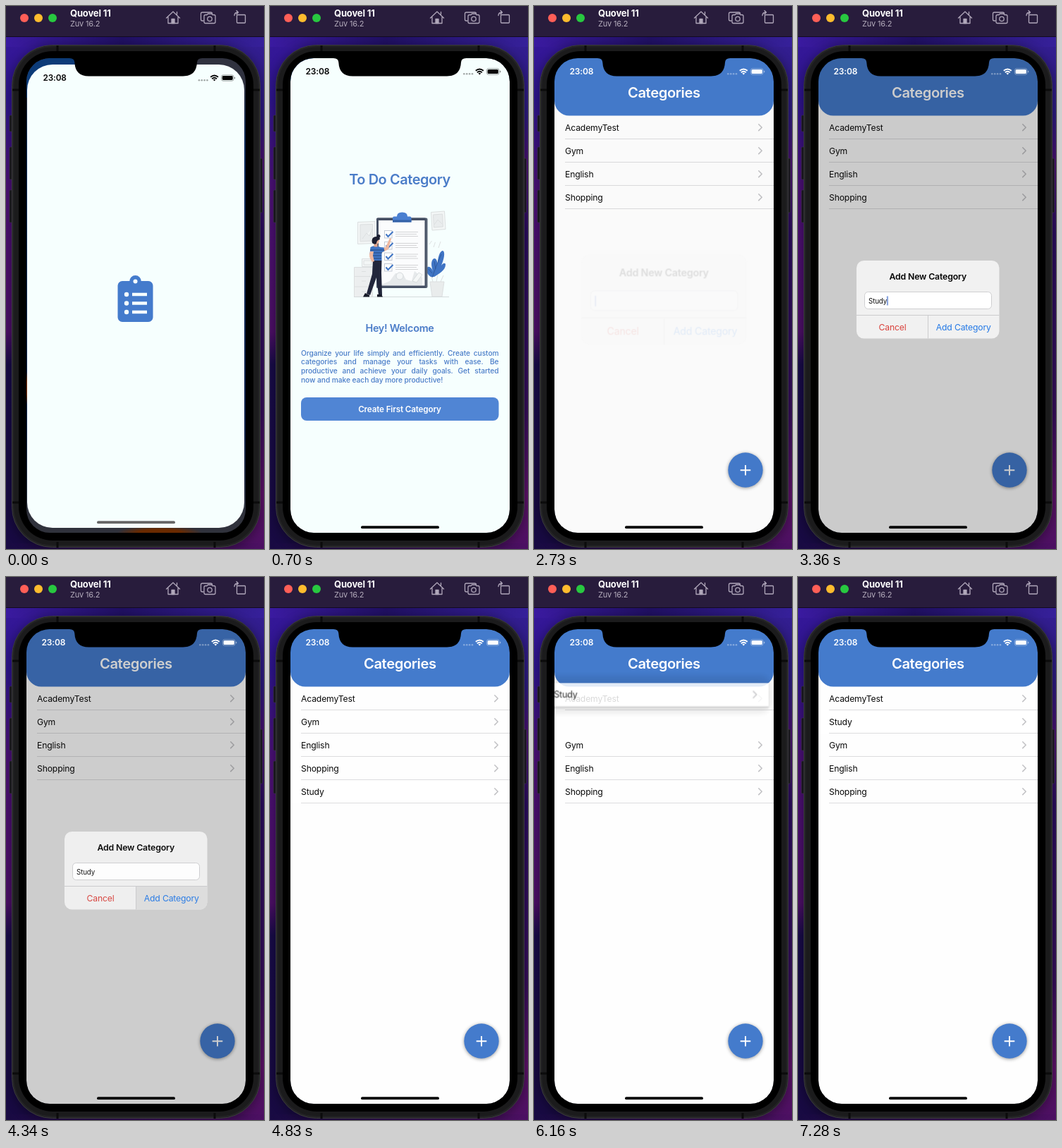
Write an HTML page that moves like this. It is 366 by 770 pixels and loops after 8 s.

```html
<!DOCTYPE html>
<html lang="en">
<head>
<meta charset="utf-8">
<title>To Do Category</title>
<style>
html, body { margin: 0; width: 100%; height: 100%; overflow: hidden; background: #1c0f50; }
.layer, .layer > svg { position: absolute; left: 0; top: 0; width: 366px; height: 770px; }
svg { display: block; font-family: Inter, "Open Sans", sans-serif; letter-spacing: -.01em; }
.screen {
  clip-path: inset(74px 26px 23px 29px round 33px);
  background:
    radial-gradient(ellipse 60px 10px at 218px 747px, #6a2a00 50%, transparent),
    radial-gradient(ellipse 3px 24px at 29px 542px, #8a3500 40%, transparent),
    linear-gradient(90deg, #0c3b78 30%, transparent 60%) 0 0 / 100% 130px no-repeat,
    linear-gradient(#30323f 110px, #0d2c5c 200px, #12244c 600px, #30323c 720px);
}

/* one shared 8 s clock */
.a { animation: 8s linear infinite; }
.step { animation-timing-function: step-end; }

.app { animation-name: open; }
@keyframes open {
  0%, .8% { clip-path: inset(83px 28px 30px 30px round 36px); animation-timing-function: ease-out; }
  3.2%, 100% { clip-path: inset(74px 26px 23px 29px round 33px); }
}
.status { transform-origin: 184px 93px; animation-name: settle, tint; }
@keyframes settle {
  0%, .8% { transform: translateY(9px) scale(.985); animation-timing-function: ease-out; }
  3.2%, 100% { transform: none; }
}
@keyframes tint { 0%, 18% { color: #050505; } 18.9%, 100% { color: #fff; } }
.home { animation-name: rise; }
@keyframes rise {
  0%, .8% { transform: translateY(-7px); fill: #666; animation-timing-function: ease-out; }
  3.2%, 100% { transform: none; fill: #000; }
}
.splash { animation-name: splash; }
@keyframes splash { 0%, 5.8% { opacity: 1; } 8.7%, 100% { opacity: 0; } }
.press { animation-name: press; }
@keyframes press { 0% { opacity: 1; } 14.87% { opacity: .75; } 15.74%, 100% { opacity: 1; } }

.cats { animation-name: push; }
@keyframes push {
  0%, 17.94% { transform: translateX(311px); animation-timing-function: cubic-bezier(.2, .7, .2, 1); }
  25%, 100% { transform: none; }
}
.welcome { animation-name: slide; }
@keyframes slide {
  0%, 17.94% { transform: none; animation-timing-function: cubic-bezier(.2, .7, .2, 1); }
  25%, 100% { transform: translateX(-93px); }
}
.shade { mix-blend-mode: multiply; animation-name: shade; }
@keyframes shade {
  0%, 17.94% { opacity: 0; animation-timing-function: cubic-bezier(.2, .7, .2, 1); }
  25%, 100% { opacity: 1; }
}
.plus { animation-name: plus; }
@keyframes plus { 0% { opacity: 1; } 29.74% { opacity: .55; } 34.1%, 100% { opacity: 1; } }

.dim { animation-name: dim; }
@keyframes dim { 0%, 33.9% { opacity: 0; } 37.2%, 54.1% { opacity: .2; } 57.6%, 100% { opacity: 0; } }
.alert { transform-origin: 184px 416px; animation-name: alert; }
@keyframes alert {
  0%, 33.9% { opacity: 0; transform: scale(1.18); animation-timing-function: ease-out; }
  37.2%, 54.1% { opacity: 1; transform: none; }
  57.6%, 100% { opacity: 0; transform: none; }
}
.k1 { animation-name: k1; } .k2 { animation-name: k2; } .k3 { animation-name: k3; } .k4 { animation-name: k4; }
@keyframes k1 { 0% { fill: transparent; } 38.49%, 100% { fill: #111; } }
@keyframes k2 { 0% { fill: transparent; } 39.36%, 100% { fill: #111; } }
@keyframes k3 { 0% { fill: transparent; } 40.24%, 100% { fill: #111; } }
@keyframes k4 { 0% { fill: transparent; } 41.99%, 100% { fill: #111; } }
.caret { animation-name: caret; }
@keyframes caret {
  0% { transform: none; opacity: 1; }
  38.49% { transform: translateX(6.3px); }
  39.36% { transform: translateX(9.7px); }
  40.24% { transform: translateX(15.4px); }
  41.99% { transform: translateX(26.6px); opacity: 1; }
  49.87% { transform: translateX(26.6px); opacity: .4; }
  50.74%, 100% { transform: translateX(26.6px); opacity: 0; }
}
.tap { animation-name: tap; }
@keyframes tap { 0% { opacity: 0; } 52.49% { opacity: 1; } 58%, 100% { opacity: 0; } }

.added { animation-name: added; }
@keyframes added { 0% { opacity: 0; } 60.37%, 100% { opacity: 1; } }
.held { animation-name: held; }
@keyframes held { 0% { fill: #fff; } 68.24% { fill: #e5e5ea; } 70.86%, 100% { fill: #fff; } }
.drag { transform-origin: 29px 288px; animation-name: drag; }
@keyframes drag {
  0%, 70.6% { transform: none; opacity: 1; animation-timing-function: ease-out; }
  71.8% { transform: translate(-6px, -10px) scale(1.03); opacity: .85; animation-timing-function: cubic-bezier(.4, .3, .6, 1); }
  76.9%, 81.3% { transform: translate(-16.4px, -138px) scale(1.03); opacity: .85; }
  83.1%, 84.8% { transform: translate(-16.4px, -140px) scale(1.03); opacity: .85; animation-timing-function: ease-in-out; }
  90.8%, 100% { transform: translate(0, -99px); opacity: 1; }
}
.lift { filter: blur(4px); animation-name: lift; }
@keyframes lift { 0%, 70.6% { opacity: 0; } 72%, 84.8% { opacity: .1; } 90.8%, 100% { opacity: 0; } }
.edge { filter: blur(1.2px); animation-name: edge; }
@keyframes edge { 0%, 70.6% { opacity: 0; } 72%, 84.8% { opacity: .14; } 90.8%, 100% { opacity: 0; } }
.s1 { animation-name: s1; } .s2 { animation-name: s2; } .s3 { animation-name: s3; }
@keyframes s1 { 0%, 71.7% { transform: none; } 73.8%, 100% { transform: translateY(33px); } }
@keyframes s2 { 0%, 73.3% { transform: none; } 75.1%, 100% { transform: translateY(33px); } }
@keyframes s3 { 0%, 74.9% { transform: none; } 76.8%, 100% { transform: translateY(33px); } }

.mid { text-anchor: middle; }
.head { text-anchor: middle; font-weight: 600; letter-spacing: -.02em; }
.item { font-size: 12.2px; fill: #0a0a0a; }
.fab { filter: drop-shadow(0 1px 2.5px rgba(0, 0, 0, .4)); }
.glow { filter: blur(7px); opacity: .3; }
.para { font-size: 10.2px; font-weight: 500; line-height: 12.6px; letter-spacing: -.005em; color: #4a7cc8; }
.para div { text-align: justify; text-align-last: justify; }
.para div:last-child { text-align-last: left; }
</style>
</head>
<body>
<div class="layer">
  <svg viewBox="0 0 366 770">
    <defs>
      <linearGradient id="left" x2="0" y2="1">
        <stop offset="0" stop-color="#3a1aa0"/><stop offset=".17" stop-color="#2d148c"/>
        <stop offset=".33" stop-color="#4a1075"/><stop offset=".6" stop-color="#4c0f66"/>
        <stop offset=".66" stop-color="#180b48"/><stop offset="1" stop-color="#180a42"/>
      </linearGradient>
      <linearGradient id="right" x2="0" y2="1">
        <stop offset="0" stop-color="#36209a"/><stop offset=".2" stop-color="#2c1a7e"/>
        <stop offset=".29" stop-color="#48106e"/><stop offset=".42" stop-color="#2a0d5e"/>
        <stop offset=".75" stop-color="#360e5a"/><stop offset=".9" stop-color="#5c1268"/>
        <stop offset="1" stop-color="#4c1062"/>
      </linearGradient>
      <linearGradient id="strip">
        <stop offset="0" stop-color="#3a1aa0"/><stop offset=".45" stop-color="#201062"/><stop offset="1" stop-color="#36209a"/>
      </linearGradient>
      <linearGradient id="floor">
        <stop offset="0" stop-color="#180a42"/><stop offset="1" stop-color="#4c1062"/>
      </linearGradient>
    </defs>
    <rect width="183" height="770" fill="url(#left)"/>
    <rect x="183" width="183" height="770" fill="url(#right)"/>
    <rect y="44" width="366" height="14" fill="url(#strip)"/>
    <rect y="762" width="366" height="8" fill="url(#floor)"/>
    <rect class="glow" x="6" y="56" width="357" height="716" rx="58"/>
    <rect width="366" height="43" fill="#281c3c"/>
    <rect y="43" width="366" height="1" fill="#120b20"/>
    <circle cx="26" cy="17" r="6" fill="#ff5f57"/>
    <circle cx="46" cy="17" r="6" fill="#febc2e"/>
    <circle cx="66" cy="17" r="6" fill="#28c840"/>
    <text x="91" y="15" font-size="13" font-weight="700" fill="#fff">Quovel 11</text>
    <text x="91" y="29" font-size="11" fill="#b5adbd">Zuv 16.2</text>
    <g fill="none" stroke="#b0a7ba" stroke-width="1.3" stroke-linejoin="round" stroke-linecap="round">
      <path d="M227.500 17L237 8l9.500 9M230 15.500V24.500h14v-9M242.500 12V8.500"/>
      <path d="M235 24.500v-6h4v6z" fill="#b0a7ba"/>
      <path d="M280 21h-1.500q-2 0-2-2v-8q0-2 2-2h12q2 0 2 2"/>
      <path d="M283 12.500h2l1.500-1.500h5l1.500 1.500h2q2 0 2 2v8q0 2-2 2h-12q-2 0-2-2v-8q0-2 2-2z"/>
      <circle cx="289" cy="18.300" r="3.200"/>
      <rect x="327.500" y="12.500" width="12" height="11.500" rx="1"/>
      <path d="M324 13.500q0-4.500 5.500-4.500M327 6.500l2.500 2.500-2.500 2.500"/>
    </g>
    <g fill="#17151c" stroke="#39363f" stroke-width=".6">
      <rect x="5" y="155" width="6" height="23" rx="1.500"/>
      <rect x="5" y="200" width="6" height="46" rx="1.500"/>
      <rect x="5" y="261" width="6" height="46" rx="1.500"/>
      <rect x="358" y="216" width="5.500" height="77" rx="1.500"/>
    </g>
    <rect x="8.500" y="55.500" width="352" height="712" rx="57" fill="#232325" stroke="#3b3b3d"/>
    <rect x="11.500" y="58.500" width="346" height="706" rx="54" fill="#1b1b1c"/>
    <path d="M9 119h9M351 119h9M9 704h9M351 704h9M73 56v8M296 56v8M73 760v8M296 760v8" stroke="#0b0b0b" stroke-width="3"/>
    <rect x="18" y="64" width="333" height="694" rx="48"/>
  </svg>
</div>

<div class="layer screen">
  <div class="layer app a">
    <svg viewBox="0 0 366 770">
      <defs>
        <g id="row">
          <path d="M44 188.500H340" stroke="#dcdcde"/>
          <path d="M318.800 167.800l4.400 4.400-4.400 4.400" fill="none" stroke="#c3c3c6" stroke-width="1.600" stroke-linecap="round" stroke-linejoin="round"/>
        </g>
        <g id="check">
          <rect x="162.500" y="318.500" width="10.500" height="10.500" fill="#fff" stroke="#c3c9d4"/>
          <path d="M164.500 323.500l3 3.500 7-7" fill="none" stroke="#3f74c4" stroke-width="2"/>
          <path d="M178 320.500h32M178 323.500h30M178 326.500h32" stroke="#d3d3d5" stroke-width="1"/>
        </g>
      </defs>

      <g class="welcome a">
        <rect x="29" y="74" width="311" height="673" fill="#f6fffe"/>
        <text class="head" x="184" y="253.300" font-size="19.900" fill="#4a7cc8">To Do Category</text>

        <g fill="#f3f6f6" stroke="#dcdfe0">
          <path d="M124.500 306.500l24.500-1v31l-24.500 1z"/>
          <path d="M128 310l17.500-.5v23.500l-17.500 1zM131 330l6-8 4 4 4-10" fill="#e9eced"/>
          <path d="M228.500 292.500l19-1.500 1.500 25.500-19 1.500z"/>
          <path d="M231.500 296l13-1 1 18-13 1zM233 310l5-7 6 6" fill="#e9eced"/>
          <path d="M226 338q4-6 3-4M232 342q3-8 2-7M239 343l3-9" fill="none"/>
          <path d="M130.500 358.500h16v11h-16zM133 361h11v6h-11z"/>
          <path d="M119.500 370.500h26v42h-26zM119.500 383.500h26M119.500 398h26M130 376.500h6M130 390h6M130 405h6" fill="#eceeef"/>
          <path d="M227 391h20l-3 21h-14z" fill="#e9ecec"/>
          <path d="M231 391l-2-8M236 391l2-10M242 391l4-9" fill="none"/>
        </g>
        <g fill="#3f74c4">
          <path d="M228 384c-9-7-6-13-4-14 3-1 6 3 7 6-4-12-1-17 2-18 4 0 5 6 4 12 1-14 4-23 8-23 4 1 2 12-2 21 3-4 6-4 6-1 0 8-10 13-16 17z"/>
          <path d="M230 385q5-15 13-33M230 379l-5-6M235 373l-2-11" fill="none" stroke="#2d5595" stroke-width=".8"/>
        </g>
        <rect x="151" y="300.500" width="72.500" height="99.500" rx="2" fill="#5a6475"/>
        <rect x="151" y="300.500" width="70.500" height="99.500" rx="2" fill="#465064"/>
        <rect x="154" y="304" width="65.500" height="92.500" fill="#fbfcfd"/>
        <path d="M174 306.500v-6q0-2 2-2h4q0-6 7.500-6t7.500 6h3.500q2 0 2 2v6z" fill="#4a7fd0"/>
        <path d="M174 303.500h26.500v3H174z" fill="#3561a6"/>
        <use href="#check"/><use href="#check" y="16"/><use href="#check" y="31.500"/><use href="#check" y="47"/>
        <path d="M156 396l14-6 8-11h10l5 9 8 2 4-14 11 9v11z" fill="#e6e9eb"/>
        <circle cx="184" cy="383" r="5" fill="#f4f6f7" stroke="#d8dcde"/>
        <path d="M202 390l9-12 5 3-8 11z" fill="#f5f7f7" stroke="#cfd4d6" stroke-width=".7"/>
        <path d="M119 412.500H254" stroke="#d5dadb"/>

        <path d="M156 344l8-2 6-13 2 1-4 15-10 5z" fill="#efb8a0"/>
        <path d="M146 361h12.500l-.5 17 1 32h-5l-3-25-9 25-5-2 8-28z" fill="#22263b"/>
        <path d="M135 407l6 3v2.500h-9zM152 409h6l2 3.500h-8z" fill="#171a28"/>
        <path d="M142.500 342q7-4 14 0l5 .5 1 5-4 2v11.500h-13l-1-6-3-3z" fill="#3f74c4"/>
        <path d="M142 346h20M142 350h17M143 354h15M145 358h13" stroke="#27497f" stroke-width="1.100"/>
        <path d="M142 348q-3 8 3 15l3-1-2-8 1-6z" fill="#efb8a0"/>
        <path d="M147.500 335h5v6.500h-5z" fill="#e3a58c"/>
        <circle cx="150.500" cy="333" r="4.500" fill="#efb8a0"/>
        <path d="M145 336q-2-8 5-9 6 0 6 4-5 1-5 6-3 2-6-1z" fill="#1b1e30"/>
        <circle cx="154" cy="326.500" r="2.500" fill="#1b1e30"/>

        <text class="head" x="184" y="462.300" font-size="14.400" fill="#4a7cc8">Hey! Welcome</text>
        <foreignObject x="44" y="485.800" width="280.500" height="54">
          <div class="para">
            <div>Organize your life simply and efficiently. Create custom</div>
            <div>categories and manage your tasks with ease. Be</div>
            <div>productive and achieve your daily goals. Get started</div>
            <div>now and make each day more productive!</div>
          </div>
        </foreignObject>
        <g class="press a step">
          <rect x="44" y="555" width="280.500" height="33" rx="8" fill="#5085d4"/>
          <text class="mid" x="184" y="576.200" font-size="11.700" font-weight="600" fill="#fff">Create First Category</text>
        </g>
        <rect class="shade a" x="29" y="74" width="404" height="673" fill="#e8dfe0"/>
      </g>

      <g class="splash a">
        <rect x="29" y="74" width="311" height="673" fill="#f6fffe"/>
        <rect x="158.500" y="390" width="50" height="58" rx="6.500" fill="#447bcc"/>
        <circle cx="183.500" cy="390.300" r="8.300" fill="#447bcc"/>
        <g fill="#f6fffe">
          <circle cx="183.500" cy="390.500" r="3"/>
          <circle cx="171" cy="409" r="3.200"/><circle cx="171" cy="421.500" r="3.200"/><circle cx="171" cy="434" r="3.200"/>
          <path d="M179 406.800h21v4.400h-21zM179 419.300h21v4.400h-21zM179 431.800h21v4.400h-21z"/>
        </g>
      </g>

      <g class="cats a">
        <rect x="29" y="74" width="311" height="673" fill="#fefefe"/>
        <g class="item">
          <use href="#row"/><text x="44" y="176.600">AcademyTest</text>
          <g class="s3 a"><use href="#row" y="33"/><text x="44" y="209.600">Gym</text></g>
          <g class="s2 a"><use href="#row" y="66"/><text x="44" y="242.600">English</text></g>
          <g class="s1 a"><use href="#row" y="99"/><text x="44" y="275.600">Shopping</text></g>
        </g>
        <path d="M29 74H340V134.500a21 21 0 0 1-21 21H50a21 21 0 0 1-21-21z" fill="#447bcc"/>
        <text class="head" x="184.300" y="130.300" font-size="20.200" fill="#fff">Categories</text>
        <g class="added a step">
          <g class="drag a">
            <rect class="lift a" x="20" y="278" width="324" height="52" rx="16"/>
            <rect class="edge a" x="29" y="289" width="311" height="34"/>
            <rect class="held a step" x="29" y="288" width="311" height="33"/>
            <use href="#row" y="132"/>
            <text class="item" x="44" y="308.600">Study</text>
          </g>
        </g>
        <circle class="fab" cx="300" cy="658" r="24.700" fill="#447bcc"/>
        <path class="plus a step" d="M292.700 658.200h14.600M300 650.900v14.600" stroke="#fff" stroke-width="1.900"/>
      </g>

      <rect class="dim a" x="29" y="74" width="311" height="673" opacity="0"/>
      <g class="alert a">
        <rect x="83" y="361" width="202.500" height="110.500" rx="10.500" fill="#f1f1f1"/>
        <path class="tap a step" d="M184.500 438.500h101V461a10.500 10.500 0 0 1-10.500 10.500h-90.500z" fill="#dedede"/>
        <text class="mid" x="184.200" y="388" font-size="12.300" font-weight="600" fill="#050505">Add New Category</text>
        <rect x="94.500" y="405.500" width="180" height="24" rx="5" fill="#fff" stroke="#cfcfd1"/>
        <text x="100" y="421.500" font-size="9.800"><tspan class="k1 a step">S</tspan><tspan class="k2 a step">t</tspan><tspan class="k3 a step">u</tspan><tspan class="k4 a step">dy</tspan></text>
        <rect class="caret a step" x="99.700" y="411.500" width="1.300" height="13" fill="#3a66c8"/>
        <path d="M83 438.500h202.500M184.500 438.500v33" stroke="#cbcbcd"/>
        <g class="mid" font-size="12.200">
          <text x="134" y="459.600" fill="#d9413b">Cancel</text>
          <text x="234.800" y="459.600" fill="#2479e6">Add Category</text>
        </g>
      </g>

      <g class="status a" fill="currentColor">
        <text x="50.500" y="97.400" font-size="12" font-weight="600">23:08</text>
        <g opacity=".35">
          <circle cx="275.300" cy="96.300" r="1.300"/><circle cx="279.200" cy="96.300" r="1.300"/>
          <circle cx="283.100" cy="96.300" r="1.300"/><circle cx="287" cy="96.300" r="1.300"/>
        </g>
        <g fill="none" stroke="currentColor" stroke-width="1.900">
          <path d="M291.800 91.800q5.500-4.600 11 0M293.800 94.200q3.500-2.800 7 0"/>
        </g>
        <path d="M297.300 97.500l-1.900-2.100q1.900-1.400 3.800 0z"/>
        <rect x="307.400" y="88.700" width="17.600" height="8.600" rx="2.600" fill="none" stroke="currentColor" stroke-width=".8" opacity=".45"/>
        <rect x="308.600" y="89.900" width="15.200" height="6.200" rx="1.500"/>
        <path d="M326 91.400q1.400.4 1.400 1.600t-1.400 1.600z" opacity=".5"/>
      </g>
      <rect class="home a" x="129" y="737.200" width="111" height="3.900" rx="1.950"/>
    </svg>
  </div>
</div>

<div class="layer">
  <svg viewBox="0 0 366 770">
    <path d="M90 73v1q7 0 7.300 6 1 19.500 20 19.500H251q19 0 20-19.500.3-6 7.300-6v-1z"/>
  </svg>
</div>
</body>
</html>
```
